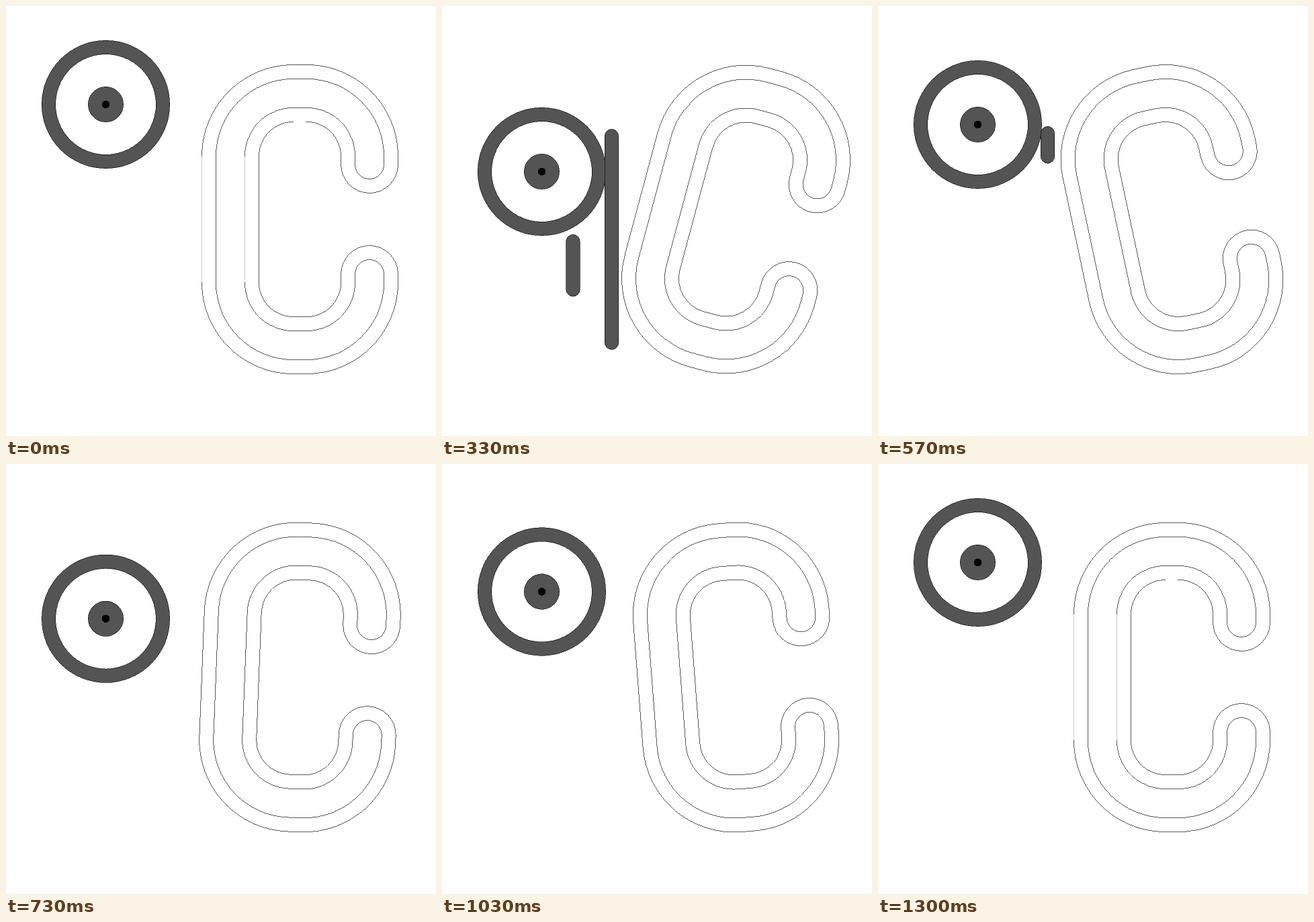
Animation, 640 px wide and 640 px high, one loop 1670 ms. Source, as an HTML page:

```html
<!DOCTYPE html>
<html lang="en">
<head>
<meta charset="utf-8">
<title>Degrees Celsius</title>
<style>
  html, body { margin: 0; width: 100%; height: 100%; overflow: hidden; background: #fff; }
  svg { display: block; width: 100vw; height: 100vh; shape-rendering: crispEdges; }
  .solid { fill: #545454; stroke: #000; stroke-width: .6; }
  .hole { fill: #fff; stroke: #000; stroke-width: .6; }
  .letter path { fill: none; stroke: #000; stroke-width: .65; }
</style>
</head>
<body>
<svg viewBox="0 0 640 640">
  <g class="letter" id="letter">
    <path id="outer"/>
    <path id="inner"/>
  </g>
  <g id="soften" stroke="#fff" stroke-width="1">
    <path d="M291.5 224V411M355.5 224V411" opacity=".7"/>
    <path d="M428 172.5H446"/>
  </g>
  <g id="ring">
    <circle class="solid" cx="148.5" r="95.2"/>
    <circle class="hole" cx="148.5" r="74.8"/>
    <circle class="solid" cx="148.5" r="26.2"/>
    <circle cx="148.5" r="5.8"/>
  </g>
  <rect class="solid" id="short" x="184.8" width="20.4" rx="10.2"/>
  <rect class="solid" id="long" x="242.3" width="20.4" rx="10.2"/>
</svg>
<script>
const LOOP = 1670, STEP = 100 / 3, LAST = 39;
const el = id => document.getElementById(id);

// Keys: [step, value, optional warp of the easing that leads here]
const TILT = [[0, 0], [10, 15, .86], [17, -12], [24, 5.8], [31, -4.4], [39, 0]];
const DROP = [[0, 0], [10, 100, .95], [17, 30], [24, 97], [37.1, 0]];

const BARS = [
  { node: el('short'), base: 511, travel: 150, head: [0, 7.6], tail: [5, 14.7] },
  { node: el('long'), base: 539, travel: 339, head: [.44, 10.66], tail: [8.05, 19.2] }
];

const ease = u => u * u * (3 - 2 * u);
const span = (f, [a, b]) => ease(Math.min(1, Math.max(0, (f - a) / (b - a))));

function sample(keys, f) {
  const i = keys.findIndex(k => k[0] > f);
  if (i < 0) return keys[keys.length - 1][1];
  const [a, from] = keys[i - 1], [b, to, warp = 1] = keys[i];
  return from + (to - from) * ease(((f - a) / (b - a)) ** warp);
}

// Outline of the letter C at distance d from its centre line
function outline(d) {
  const L = 333.95, R = 541.05, T = 129.95, B = 505.05;
  const x1 = 427.5, x2 = 447.5, y1 = 223.5, y2 = 411.5, top = 236, low = 399;
  const arc = (r, sweep, x, y) => `A${r} ${r} 0 0 ${sweep} ${x} ${y}`;
  const big = x1 - L + d, small = x1 - L - d;
  return `M${R + d} ${top}V${y1}` + arc(big, 0, x2, T - d) +
    `H${x1}` + arc(big, 0, L - d, y1) +
    `V${y2}` + arc(big, 0, x1, B + d) +
    `H${x2}` + arc(big, 0, R + d, y2) +
    `V${low}` + arc(d, 0, R - d, low) +
    `V${y2}` + arc(small, 1, x2, B - d) +
    `H${x1}` + arc(small, 1, L + d, y2) +
    `V${y1}` + arc(small, 1, x1, T + d) +
    `H${x2}` + arc(small, 1, R - d, y1) +
    `V${top}` + arc(d, 0, R + d, top) + 'Z';
}

function drawBar(bar, f) {
  const head = span(f, bar.head), tail = span(f, bar.tail);
  const y = bar.base - 21 - bar.travel * head;
  const end = bar.base - bar.travel * tail;
  bar.node.setAttribute('y', y + .3);
  bar.node.setAttribute('height', end - y - .6);
  bar.node.style.display = head - tail > .004 ? '' : 'none';
}

function draw(now) {
  const f = Math.min(LAST, Math.floor((now % LOOP + 4) / STEP));
  const tilt = sample(TILT, f);
  el('letter').setAttribute('transform', `rotate(${tilt} 437.5 317.5)`);
  el('soften').style.display = tilt ? 'none' : '';
  el('ring').setAttribute('transform', `translate(0 ${146.5 + sample(DROP, f)})`);
  BARS.forEach(bar => drawBar(bar, f));
}

el('outer').setAttribute('d', outline(42.45));
el('inner').setAttribute('d', outline(21.45));

const start = performance.now();
function tick() {
  draw(performance.now() - start);
  requestAnimationFrame(tick);
}
tick();
</script>
</body>
</html>
```
